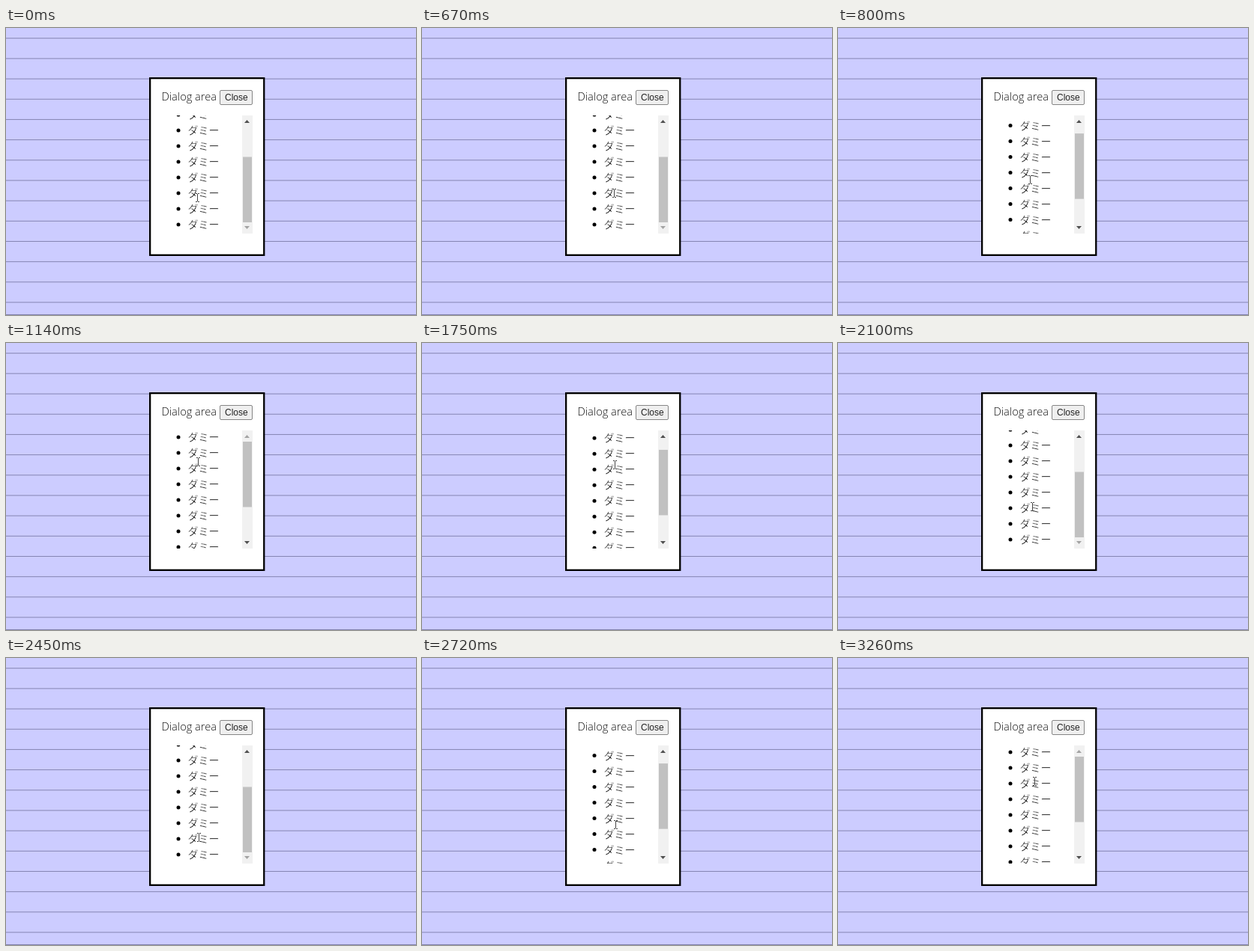
An HTML page that plays this animation: 547x384 px, repeating every 3660 ms.

```html
<!DOCTYPE html>
<html lang="ja">
<head>
<meta charset="utf-8">
<title>Dialog scroll</title>
<style>
  html, body { margin: 0; width: 100%; height: 100%; overflow: hidden; background: #ccf; }
  svg { display: block; width: 100%; height: 100%; }
  .title { font: 300 14.6px "Open Sans", "Noto Sans", sans-serif; fill: #111; }
  .button { font: 12px "Liberation Sans", Arial, sans-serif; fill: #222; }
  /* The white outline thins the strokes to a light weight */
  .item { font: 300 14px "Noto Sans CJK JP", "Noto Sans CJK", sans-serif; fill: #000; stroke: #fff; stroke-width: .4; }
</style>
</head>
<body>
<svg viewBox="0 0 547 384">
  <defs><clipPath id="view"><rect x="208" y="117" width="107" height="158"/></clipPath></defs>
  <rect width="547" height="384" fill="#ccf"/>
  <g id="rules" fill="#8585b2"></g>
  <rect x="192.15" y="67.15" width="152.1" height="236.7" fill="#fff" stroke="#000" stroke-width="2.3"/>
  <text class="title" x="207.5" y="97">Dialog area</text>
  <rect x="285.5" y="83.5" width="43" height="19" rx="1.5" fill="#efefef" stroke="#858585"/>
  <text class="button" x="292" y="97">Close</text>
  <g clip-path="url(#view)"><g id="list"></g></g>
  <rect x="315" y="117" width="14" height="158" fill="#f1f1f1"/>
  <rect id="thumb" x="316" width="12" height="87.5" fill="#c1c1c1"/>
  <path id="up" d="M318 127h7l-3.5-4z"/>
  <path id="down" d="M318 265h7l-3.5 4z"/>
  <path id="pointer" d="M-2.5-5.5H-.5M.5-5.5H2.5M0-5V5M-2.5 5.5H-.5M.5 5.5H2.5" fill="none" stroke="#444"/>
</svg>
<script>
const LOOP = 3660, MAX_SCROLL = 73, STEP = 68.5;
const $ = id => document.getElementById(id);

function add(parent, tag, attrs, text = '') {
  const el = document.createElementNS('http://www.w3.org/2000/svg', tag);
  for (const key in attrs) el.setAttribute(key, attrs[key]);
  el.textContent = text;
  parent.append(el);
}

const ruleRows = Array.from({ length: 14 }, (_, i) => 13.2 + 27.18 * i);
for (const y of [...ruleRows, 383]) add($('rules'), 'rect', { y, width: 547, height: 1 });

for (let i = 0; i < 11; i++) {
  const y = 126 + 21 * i;
  add($('list'), 'circle', { cx: 230, cy: y, r: 2.5 });
  add($('list'), 'text', { class: 'item', x: 242.5, y: y + 5 }, 'ダミー');
}

// Pointer moves: first step, last step, step count, destination
const moves = [
  [70, 70, 1, 256.5, 227],
  [670, 670, 1, 256.5, 221],
  [730, 1140, 7, 256.5, 159],
  [1210, 1490, 5, 256.5, 151],
  [1750, 1890, 3, 260.5, 188],
  [1960, 2170, 4, 258.5, 229],
  [2310, 2450, 3, 257.5, 240],
  [2650, 3130, 8, 262.5, 171],
  [3190, 3260, 2, 262.5, 165]
];
const scrolls = [[730, 0], [1750, MAX_SCROLL], [2650, 0]];
const scrollEase = [0.27, 0.774, 0.945, 1];

function pointerAt(t) {
  let x = 255.5, y = 227;
  for (const [start, end, count, toX, toY] of moves) {
    if (t < start) break;
    const gap = (end - start) / (count - 1) || 1;
    const done = Math.min(count, Math.floor((t - start) / gap + 0.001) + 1) / count;
    x += (toX - x) * done;
    y += (toY - y) * done;
  }
  return [x, y];
}

function scrollAt(t) {
  let pos = MAX_SCROLL;
  for (const [start, to] of scrolls) {
    if (t < start) break;
    const step = Math.min(scrollEase.length - 1, Math.floor((t - start) / STEP));
    pos += (to - pos) * scrollEase[step];
  }
  return pos;
}

function draw(t) {
  const scroll = scrollAt(t);
  const [x, y] = pointerAt(t);
  $('list').setAttribute('transform', `translate(0 ${-scroll})`);
  $('thumb').setAttribute('y', 132 + scroll * 40.5 / MAX_SCROLL);
  $('up').setAttribute('fill', scroll > 0 ? '#505050' : '#a3a3a3');
  $('down').setAttribute('fill', scroll < MAX_SCROLL ? '#505050' : '#a3a3a3');
  $('pointer').setAttribute('transform', `translate(${Math.floor(x) + 0.5} ${Math.round(y)})`);
}

const begin = performance.now();
function tick() {
  draw((performance.now() - begin) % LOOP);
  requestAnimationFrame(tick);
}
tick();
</script>
</body>
</html>
```
